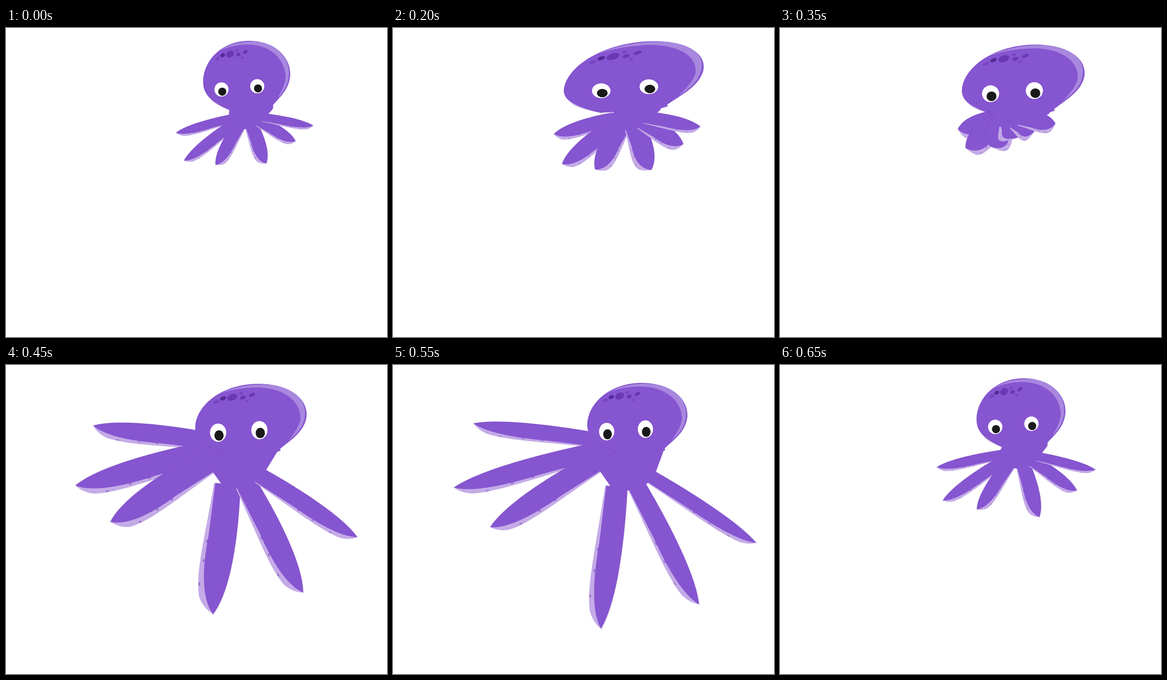
Write an HTML page with a canvas that moves like this. It is 831x674 px and loops after 700 ms.

```html
<!DOCTYPE html>
<html lang="en">
<head>
<meta charset="utf-8">
<title>Swimming octopus</title>
<style>
html, body { margin: 0; height: 100%; overflow: hidden; background: #fff; }
canvas { display: block; width: 100vw; height: 100vh; }
</style>
</head>
<body>
<canvas id="stage" width="831" height="674"></canvas>
<script>
const ctx = document.getElementById('stage').getContext('2d');
const LOOP = 700, STEP = 50;
const SKIN = '#8655d0', PALE = '#c4abe7', SHINE = '#a887de';
const LIGHT_SPOT = '#7844c2', MID_SPOT = '#6a38b3', DARK_SPOT = '#532a96';

const lerp = (a, b, k) => a + (b - a) * k;

// Rises from zero at start, falls back to zero at end, at the given speeds
const tent = (t, start, up, end, down) => Math.max(0, Math.min((t - start) * up, (end - t) * down));

function keyed(t, keys) {
  const i = keys.findIndex(([time]) => time > t);
  const [t0, v0] = keys[i - 1], [t1, v1] = keys[i];
  return lerp(v0, v1, (t - t0) / (t1 - t0));
}

// Arms breathe out a little, pull in, then kick wide
const kick = [[0, 0], [100, .24], [250, -.03], [350, -.26], [500, 1.6], [650, .14], [LOOP, 0]];

function poseAt(t) {
  const stretch = tent(t, 0, .00366, 667, .00123);
  const drop = tent(t, 160, .045, 660, .1);
  return {
    stretch, drop,
    head: { x: 525 + drop * .75, y: 104 + drop },
    hub: { x: 525 - tent(t, 100, .1, LOOP, .072), y: 190 + drop * .3 },
    reach: keyed(t, kick),
    swing: Math.min(1, tent(t, 350, .01, 667, .0087)),
    girth: 1 + Math.min(1, tent(t, 100, .005, 665, .006))
  };
}

// Angles in degrees and lengths, at rest and kicked out; side tells which edge is pale
const arm = (angle, length, wideAngle, wideLength, width, side) =>
  ({ angle, length, wideAngle, wideLength, width, side });
const arms = [
  arm(166, 159, 191, 326, 22, -1),
  arm(144, 169, 169, 366, 27, -1),
  arm(122, 128, 152, 320, 31, -1),
  arm(68, 114, 99, 359, 34, 1),
  arm(28, 121, 65, 338, 28, 1),
  arm(9, 147, 35, 320, 21, 1)
];

const headShape = new Path2D(`M490 180C462 168 429 152 430 117C431 68 473 28 530 28
  C585 28 620 62 620 100C619 136 594 153 580 171L582 174L570 179Z`);
const shineShape = new Path2D(`M465 50C495 29 538 26 565 33C600 44 618 70 617 100C617 126 602 143 592 154
  C601 138 609 123 610 105C607 62 570 36 528 36C503 36 480 42 465 50Z`);
const chinLine = new Path2D('M490 180C475 174 456 166 446 156');

// x, y, radii, colour
const spots = [
  [462, 67, 5, 3.5, LIGHT_SPOT], [472.7, 59.5, 5.5, 4, DARK_SPOT], [488.5, 57, 9, 7, MID_SPOT],
  [503.5, 48.7, 3.5, 2.5, LIGHT_SPOT], [506.8, 58, 5, 4, MID_SPOT], [522, 52, 6, 3.5, MID_SPOT],
  [515, 65, 3.2, 2.3, LIGHT_SPOT]
];

// Arms in unit space: root at 0, tip at x = 1, pale edge towards +y
const armPale = new Path2D('M0 .4C.4 .5 .7 .72 .88 .5Q.96 .34 1 0L0 0Z');
const armSkin = new Path2D('M0 -.45C.35 -.55 .8 -.52 1 0C.9 .38 .7 .52 .4 .4L0 .36Z');
const armCrease = new Path2D('M0 -.45C.35 -.55 .8 -.52 1 0');

function ellipse(x, y, rx, ry, color, angle = 0) {
  ctx.fillStyle = color;
  ctx.beginPath();
  ctx.ellipse(x, y, rx, ry, angle, 0, 7);
  ctx.fill();
}

function fill(path, color) {
  ctx.fillStyle = color;
  ctx.fill(path);
}

function stroke(path, color, width) {
  ctx.strokeStyle = color;
  ctx.lineWidth = width;
  ctx.stroke(path);
}

function polar({ x, y }, angle, radius) {
  return [x + Math.cos(angle) * radius, y + Math.sin(angle) * radius];
}

// The root swings a little further than the tip, which bends the fan
function armEnds(a, { hub, reach, swing }) {
  const angle = lerp(a.angle, a.wideAngle, swing) * Math.PI / 180;
  const length = lerp(a.length, a.wideLength, reach);
  return { root: polar(hub, angle + swing * .22, length * .2), tip: polar(hub, angle, length) };
}

function drawArm({ width, side }, { root: [x, y], tip }, girth) {
  const dx = tip[0] - x, dy = tip[1] - y;
  const w = width * girth * side / Math.hypot(dx, dy);
  ctx.save();
  ctx.transform(dx, dy, -dy * w, dx * w, x, y);
  fill(armPale, PALE);
  for (const u of [.45, .6, .78]) ellipse(u, .3 + u * .3, .012, .03, 'rgba(106,56,179,.5)');
  fill(armSkin, SKIN);
  stroke(armCrease, 'rgba(106,56,179,.18)', .03);
  ctx.restore();
}

function drawNeck(roots) {
  ctx.beginPath();
  roots.forEach(p => ctx.lineTo(...p));
  ctx.closePath();
  ctx.fillStyle = ctx.strokeStyle = SKIN;
  ctx.lineWidth = 18;
  ctx.lineJoin = 'round';
  ctx.fill();
  ctx.stroke();
}

function drawHead({ head, stretch, drop }) {
  ctx.save();
  ctx.transform(1 + stretch, drop * .003 - stretch * .17, -stretch * .4, 1, head.x, head.y);
  ctx.translate(-525, -104);
  fill(headShape, SKIN);
  fill(shineShape, SHINE);
  stroke(chinLine, 'rgba(106,56,179,.4)', 1);
  for (const [x, y, rx, ry, color] of spots) ellipse(x, y, rx, ry, color, -.6);
  ctx.restore();
}

function drawEye(x, y, { stretch, drop }) {
  const rx = 15.4 + stretch * 8.5, ry = 15.5 + drop * .33;
  ellipse(x, y, rx, ry, '#fff');
  ellipse(x + rx * .11, y + ry * .31, rx * .57, ry * .57, '#1a1a1a');
}

function draw() {
  const pose = poseAt(Math.floor(performance.now() % LOOP / STEP) * STEP);
  const { stretch, drop, head } = pose;
  const ends = arms.map(a => armEnds(a, pose));
  ctx.fillStyle = '#fff';
  ctx.fillRect(0, 0, 831, 674);
  arms.forEach((a, i) => drawArm(a, ends[i], pose.girth));
  drawNeck([[head.x - 28, head.y + 68], [head.x + 49, head.y + 68], ...ends.map(e => e.root).reverse()]);
  drawHead(pose);
  const middle = 509 - stretch * 5, gap = 39 + stretch * 22.5;
  drawEye(middle - gap, 134 + drop + stretch * 2, pose);
  drawEye(middle + gap, 127 + drop * 1.2 - stretch * 2, pose);
  requestAnimationFrame(draw);
}
draw();
</script>
</body>
</html>
```
